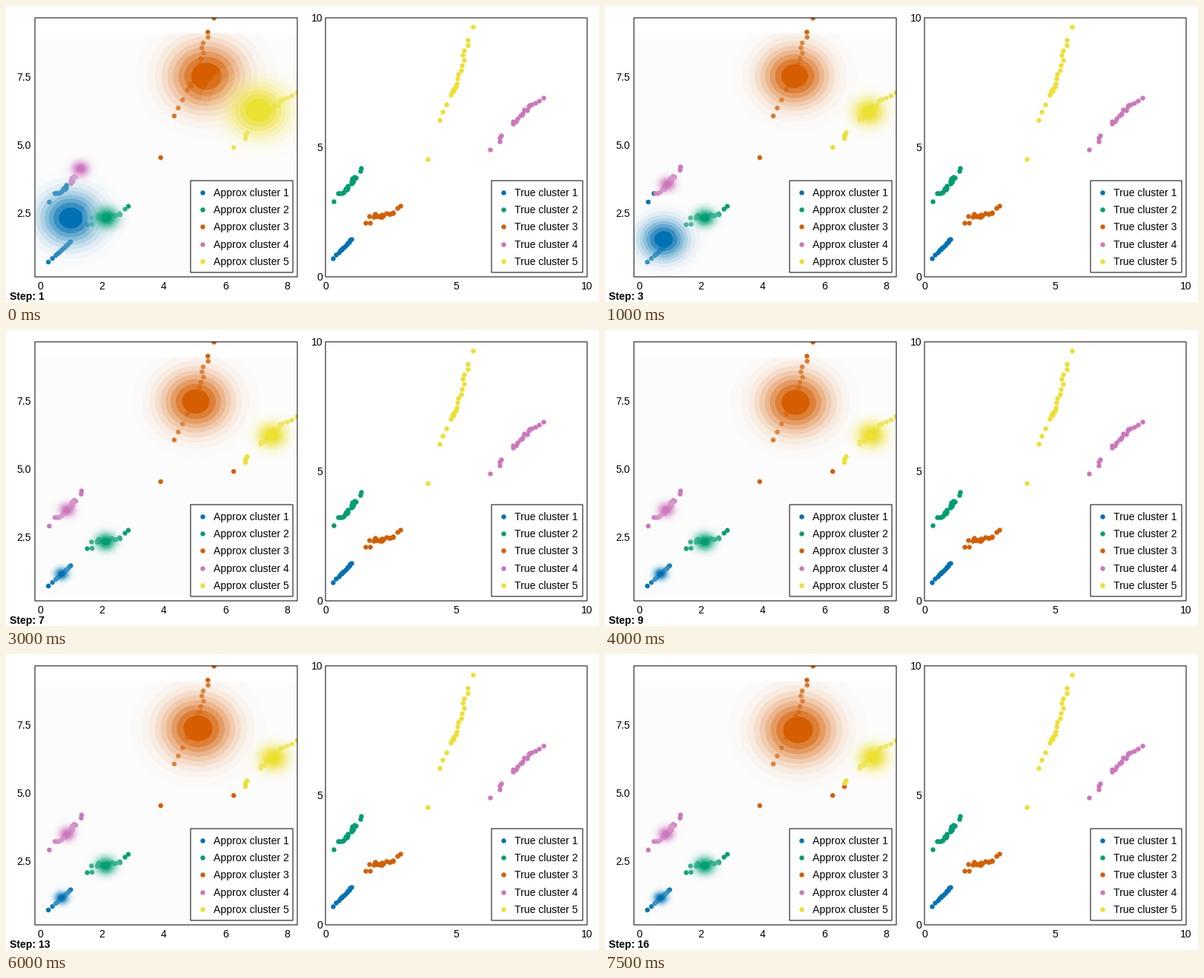
These frames come from a looping animation (800 px wide and 400 px high, 8000 ms). A matplotlib script:

```python
import numpy as np
import matplotlib.pyplot as plt
from matplotlib.animation import FuncAnimation
from matplotlib.patches import Rectangle

W, H, DPI = 800, 400, 100
STEPS, STEP_MS = 16, 500
SETTLE = 4  # steps until the fit settles
PX = 72 / DPI  # points per pixel

COLORS = np.array([(0, 114, 178), (0, 158, 115), (213, 94, 0),
                   (204, 119, 188), (236, 224, 48)]) / 255

# Panel boxes: left, top, right, bottom
FIT = (39, 16, 393, 366)
TRUE = (431, 16, 784, 366)
GRID_TOP = 37

SX, SY = 41.62, 36.85  # pixels per unit in the left panel
TX, TY = 35.3, 35  # pixels per unit in the right panel

rng = np.random.default_rng(4)


def strand(jitter, *keys):
    """Samples strung between (index, x, y) keys, scattered off the path."""
    i, x, y = np.array(keys).T
    n = np.arange(i[-1] + 1)
    path = np.column_stack([np.interp(n, i, x), np.interp(n, i, y)])
    loose = ~np.isin(n, i)[:, None]
    return path + loose * rng.uniform(-jitter, jitter, path.shape)


# Right-panel positions, one strand per true cluster
samples = [
    strand(0.4, (0, 440.5, 341), (2, 449, 332.5), (12, 466, 315)),
    strand(3, (0, 441.5, 264), (1, 448, 253), (7, 460, 248),
           (17, 470, 231), (18, 478, 223), (19, 478.5, 219)),
    strand(3, (0, 485, 293), (4, 498, 281), (10, 507, 285),
           (17, 522, 279), (19, 532, 269.5)),
    strand(2, (0, 652.5, 194), (1, 666, 182.5), (3, 668, 175),
           (4, 683.5, 159), (14, 706, 134), (18, 725, 123.5)),
    strand(2, (0, 569, 207), (1, 584.5, 153.5), (4, 599.5, 120),
           (9, 607.5, 105), (18, 623, 46), (19, 630, 28)),
]

# Fitted clusters as (x, y, spread): at the start, once settled, drift per step
START = np.array([(87.5, 286.5, 35), (135.5, 286, 15.5), (270.5, 95, 44.8),
                  (100.5, 220, 11.5), (340.5, 141, 37)])
SETTLED = np.array([(75, 329.5, 9), (134.5, 286, 12.8), (254.5, 94.7, 39),
                    (82.5, 243, 10.5), (357.5, 143.3, 19)])
DRIFT = np.zeros((5, 3))
DRIFT[2] = 0.5, 0.65, 0.42
DRIFT[4] = 0.35, -0.3, 0
# Easing powers; the first cluster slides down before it shrinks
POWER = np.full((5, 3), 3.5)
POWER[0] = 1.6, 1.6, 0.5


def params(step):
    left = max(0, 1 - (step - 1) / SETTLE)
    late = max(0, step - SETTLE)
    return SETTLED + (START - SETTLED) * left ** POWER + DRIFT * late


def dist2(x, y, cx, cy):
    return (x - cx) ** 2 + ((y - cy) * SX / SY) ** 2


all_true = np.vstack(samples)
fit_xy = np.column_stack([46 + SX * (all_true[:, 0] - TRUE[0]) / TX,
                          372.3 - SY * (TRUE[3] - all_true[:, 1]) / TY])


def labels(step):
    """Likeliest cluster of each sample under the previous step's fit."""
    cost = [dist2(*fit_xy.T, cx, cy) / (2 * s * s) + 2 * np.log(s)
            for cx, cy, s in params(max(1, step - 1))]
    return np.argmin(cost, axis=0)


# Half-pixel grid for the density bands
gx = np.arange(FIT[0], FIT[2], 0.5) + 0.25
gy = np.arange(GRID_TOP, FIT[3], 0.5)[:, None] + 0.25


def density(cx, cy, s, color):
    """Banded Gaussian fading from clear white to the cluster colour."""
    bell = np.exp(-dist2(gx, gy, cx, cy) / (2 * s * s))
    band = np.floor(10 * bell).clip(0, 9) / 9
    h, w = band.shape
    band = band.reshape(h // 2, 2, w // 2, 2).mean(axis=(1, 3))[..., None]
    return np.concatenate([1 + band * (color - 1), band], axis=2)


fig = plt.figure(figsize=(W / DPI, H / DPI), dpi=DPI, facecolor="white")
ax = fig.add_axes([0, 0, 1, 1])
ax.axis("off")


def box(l, t, r, b, z, **kw):
    kw = {"fc": "none", "ec": "black", "lw": PX, "snap": False, **kw}
    return ax.add_patch(Rectangle((l, t), r - l, b - t, zorder=z, **kw))


def text(x, y, s, ha="left", **kw):
    return ax.text(x, y, s, ha=ha, va="baseline", fontsize=14 * PX,
                   family="Liberation Sans", zorder=9, **kw)


def dots(p, c, z):
    return ax.scatter(p[:, 0], p[:, 1], s=(6.5 * PX) ** 2, c=c, lw=0, zorder=z)


def legend(l, r, word):
    box(l, 236, r, 360, 7, fc="white")
    for k, color in enumerate(COLORS):
        y = 252 + 23.2 * k
        dots(np.array([(l + 16, y)]), [color], 8)
        text(l + 31.5, y + 5, f"{word} cluster {k + 1}")


box(FIT[0], GRID_TOP, FIT[2], FIT[3], 1, fc="#fcfcfc", ec="none")
fit_dots = dots(fit_xy, COLORS[labels(1)], 2)
layers = [ax.imshow(density(*p, c), aspect="auto", interpolation="nearest",
                    extent=(FIT[0], FIT[2], FIT[3], GRID_TOP), zorder=3)
          for p, c in zip(params(1), COLORS)]
for p, c in zip(samples, COLORS):
    dots(p, [c], 2)

fit_dots.set_clip_path(box(*FIT, 5))
box(*TRUE, 5)
legend(249, 387, "Approx")
legend(655, 778, "True")

for v in range(0, 10, 2):
    text(46 + SX * v, 383, str(v), "center")
for v in (2.5, 5.0, 7.5):
    text(34, 372.3 - SY * v + 5, str(v), "right")
for v in (0, 5, 10):
    text(TRUE[0] + TX * v, 383, str(v), "center")
    text(427, TRUE[3] - TY * v + 5, str(v), "right")
caption = text(5, 397, "Step: 1", weight="bold")

# The last two strands carry each other's colour in the right panel
true_dots = [a for a in ax.collections if len(a.get_offsets()) > 1][1:]
true_dots[1].set_facecolor(COLORS[1])
true_dots[3].set_facecolor(COLORS[3])

ax.set_xlim(0, W)
ax.set_ylim(H, 0)


def update(i):
    step = i + 1
    fit_dots.set_facecolor(COLORS[labels(step)])
    for layer, p, c in zip(layers, params(step), COLORS):
        layer.set_data(density(*p, c))
    caption.set_text(f"Step: {step}")
    return [fit_dots, caption, *layers]


anim = FuncAnimation(fig, update, frames=STEPS, interval=STEP_MS,
                     repeat=True, repeat_delay=0, blit=False)
plt.show()
```
